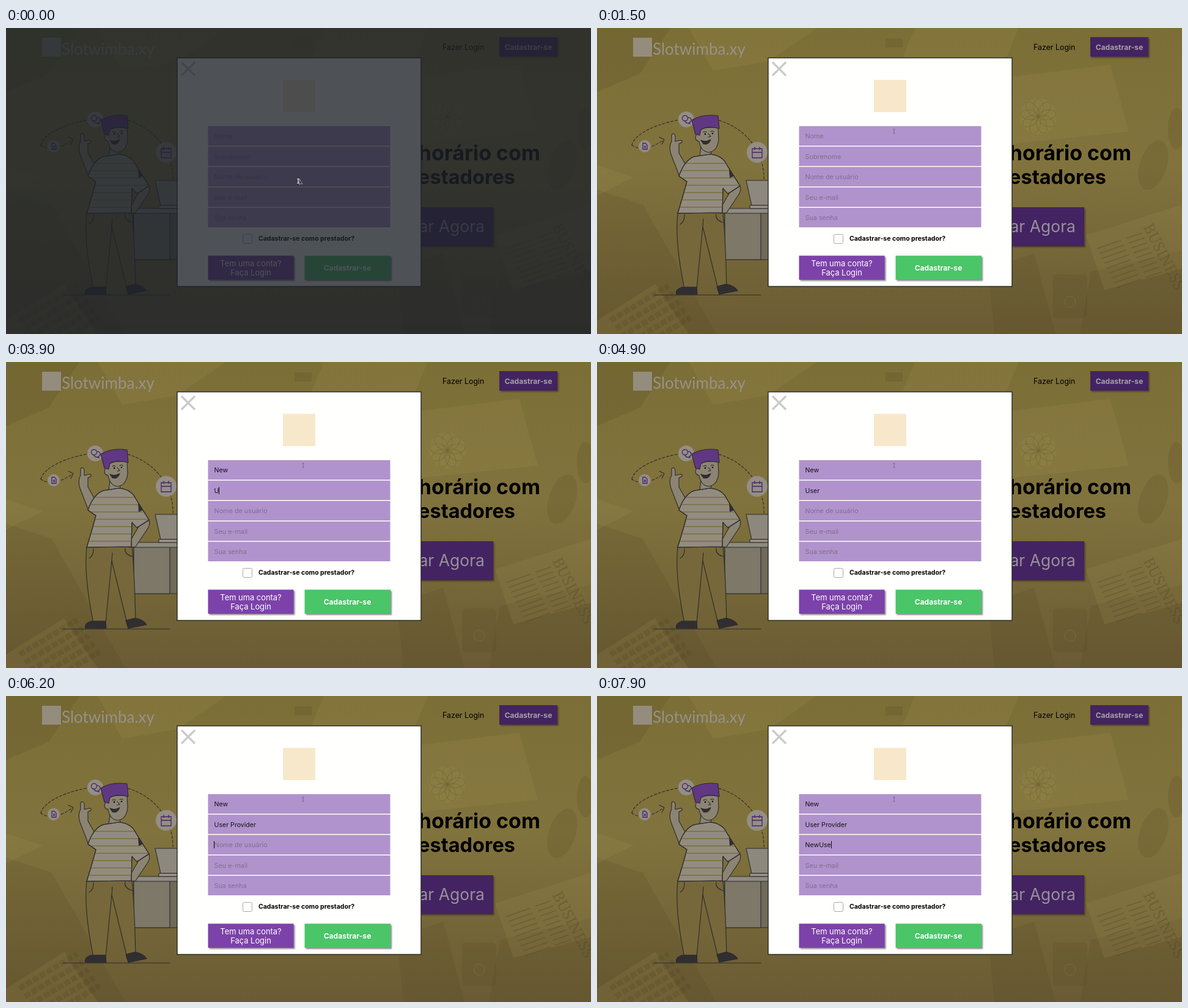
An HTML page that plays this animation: 957x502 px, repeating every 8000 ms.

```html
<!DOCTYPE html>
<html lang="pt">
<head>
<meta charset="utf-8">
<title>Cadastro</title>
<style>
  html, body { margin: 0; width: 100%; height: 100%; overflow: hidden; background: #7a6c38; }
  svg { display: block; width: 957px; height: 502px; font-family: Inter, "Open Sans", sans-serif; }
  .bold { font-weight: 700; }
  .mid { text-anchor: middle; }
  .end { text-anchor: end; }
  .ink { stroke: #2b2a2c; stroke-width: 1.1; stroke-linejoin: round; stroke-linecap: round; }
  .icon { fill: none; stroke: #452663; stroke-width: 1.3; }
  .pale { fill: #948e86; }
  .field { white-space: pre; }
</style>
</head>
<body>
<svg viewBox="0 0 957 502">
  <defs>
    <linearGradient id="desk" x2="0" y2="1">
      <stop offset="0" stop-color="#7b6e36"/>
      <stop offset=".45" stop-color="#81733d"/>
      <stop offset="1" stop-color="#6a5b34"/>
    </linearGradient>
    <filter id="soft" x="-10%" y="-10%" width="120%" height="120%"><feGaussianBlur stdDeviation="1"/></filter>
    <clipPath id="shirtClip"><path id="shirt" d="M159 211L185 207Q205 209 212 224L234 259L214 272L206 263L205 303L132 304Q141 275 147 252L134 243Q143 217 159 211Z"/></clipPath>
  </defs>

  <!-- Blurred desk photo -->
  <rect width="957" height="502" fill="url(#desk)"/>
  <g fill="#4d4222" fill-opacity=".17">
    <path d="M0 0H120L70 75L0 105Z"/>
    <path d="M0 265L75 290L195 502H0Z"/>
    <path d="M640 395L715 370L750 502H650Z"/>
    <rect x="746" y="404" width="56" height="72" rx="6"/>
    <path d="M808 400L957 365V502H790Z"/>
    <rect x="472" y="17" width="28" height="15"/>
    <ellipse cx="910" cy="225" rx="22" ry="42" transform="rotate(18 910 225)"/>
    <ellipse cx="948" cy="165" rx="14" ry="34"/>
  </g>
  <g fill="#a39355" fill-opacity=".18">
    <path d="M150 0H360L280 55L190 70Z"/>
    <path d="M520 0H690L670 48H500Z"/>
    <path d="M680 80L840 60L870 170L680 190Z"/>
    <path d="M800 340L957 290V395L830 430Z"/>
    <path d="M0 225L60 245L0 275Z"/>
    <path d="M0 480L95 420L150 502H0Z"/>
    <circle cx="722" cy="145" r="30"/>
  </g>
  <g id="keyboard" fill="none" stroke="#4a3e22" stroke-opacity=".22" stroke-width="9" stroke-dasharray="10 3"/>
  <g id="news" fill="none" stroke="#4a3e22" stroke-opacity=".25" stroke-width="2"/>
  <g id="flower" fill="none" stroke="#5d512a" stroke-opacity=".3"/>
  <circle cx="774" cy="449" r="9" fill="none" stroke="#8f7f4c" stroke-opacity=".4"/>
  <text transform="translate(893 326) rotate(63)" font-size="25" font-family="Noto Serif, serif" fill="#4a3e22" opacity=".3">BUSINESS</text>

  <!-- Header and headline -->
  <rect x="59" y="16" width="31" height="31" fill="#948c7d"/>
  <text x="91" y="44" font-size="26" fill="#96918b" font-family="Lato, sans-serif">Slotwimba.xy</text>
  <text x="714" y="36" font-size="12.4">Fazer Login</text>
  <rect x="809" y="17" width="95" height="32" fill="#443820" opacity=".7" filter="url(#soft)"/>
  <rect x="807" y="15" width="95" height="32" fill="#432361"/>
  <text class="bold mid" x="854.5" y="36" font-size="12.1" fill="#a5a1a7">Cadastrar-se</text>
  <text class="bold end" x="874" y="217" font-size="34">seu horário com</text>
  <text class="bold end" x="833" y="256" font-size="32.5">prestadores</text>
  <rect x="562" y="296" width="237" height="64" fill="#443820" opacity=".7" filter="url(#soft)"/>
  <rect x="560" y="294" width="237" height="64" fill="#432361"/>
  <text class="end" x="783" y="335" font-size="26.5" fill="#97919b">Agendar Agora</text>

  <!-- Illustration -->
  <g fill="none" class="ink" stroke-dasharray="4 3">
    <path d="M57 192C62 172 100 157 133 151"/>
    <path d="M57 192C70 203 92 196 108 184"/>
    <path d="M158 149C215 140 275 185 273 250"/>
  </g>
  <path class="ink" fill="none" d="M102 179L110 183L106 191M93 438H268"/>
  <g class="pale">
    <circle cx="146" cy="150" r="13"/><circle cx="78" cy="194" r="10"/><circle cx="262" cy="204" r="17"/>
  </g>
  <g class="icon">
    <circle cx="144" cy="148" r="4.5"/><path d="M149 147a4 4 0 0 1 2 8l1 2l-4-1q-3 0-4-3"/>
    <path d="M75 189h4l3 3v7h-7zM77 194h3M77 196h3"/>
    <path d="M254 198h16v15h-16zM254 204h16M258 195v5M266 195v5"/>
  </g>
  <g class="ink">
    <path fill="#6f6a59" d="M209 303H281V380H209Z"/>
    <path fill="#7d7868" d="M209 303H268V380H209Z"/>
    <path fill="#908b80" d="M205 296H281V304H205Z"/>
    <path fill="#8d887d" d="M244 250H281V291H253Z"/>
    <path fill="#9a948a" d="M250 291H281V296H250Z"/>
    <path fill="#76683a" d="M132 303H206Q210 340 212 424H197L173 326L163 428H143Q127 350 132 303Z"/>
    <path fill="none" d="M174 313L173 326M143 306Q144 317 136 322M195 305Q193 315 206 319"/>
    <path fill="#302e31" d="M140 425H163L164 437H130Q127 429 140 425ZM196 424L211 420Q226 423 230 431L200 437Z"/>
    <path fill="#8c8473" d="M134 241L121 207Q117 194 122 186L122 175Q126 171 128 177L128 186L137 184Q143 187 134 190L134 205L147 228L147 250Z"/>
    <path fill="#8c8473" d="M217 270L234 259Q237 267 230 276L212 303L201 304L202 296Z"/>
    <path fill="#8c8473" d="M170 195L168 210Q178 220 187 208L186 198Z"/>
    <use href="#shirt" fill="#928c80"/>
  </g>
  <g id="stripes" clip-path="url(#shirtClip)" stroke="#80754b" stroke-width="2"/>
  <use href="#shirt" class="ink" fill="none"/>
  <path d="M216 230L224 243L217 246Z" fill="#302e31"/>
  <g class="ink">
    <path fill="#8c8473" d="M163 165L198 162L199 183Q197 202 183 204Q170 203 167 186Q158 184 163 174Z"/>
    <path fill="#603783" d="M155 151Q174 140 198 144L200 165Q180 160 170 167L168 176L161 174Z"/>
    <path fill="#302e31" d="M170 184Q177 188 186 183Q182 193 174 190Z"/>
    <path fill="none" d="M174 171q3-2 5 0M186 170q3-2 5 0M182 173l4 5l-4 1"/>
  </g>
  <circle cx="177" cy="174" r="1.3"/><circle cx="189" cy="173" r="1.3"/>

  <!-- Sign-up dialog -->
  <rect x="280" y="49" width="399" height="375" fill="#fffffd" stroke="#26281f" stroke-width="1.4"/>
  <path d="M287 56L309 78M309 56L287 78" stroke="#cacaca" stroke-width="3.2"/>
  <rect x="453" y="85" width="53" height="53" fill="#f8e8cb"/>
  <g id="fields"></g>
  <rect id="caret" width="1" height="12" fill="#111"/>
  <rect x="387.5" y="338.5" width="15" height="15" rx="2" fill="#fff" stroke="#aaa"/>
  <text class="bold" x="413" y="349" font-size="10.5">Cadastrar-se como prestador?</text>
  <g fill="#8d8791" filter="url(#soft)"><rect x="332.5" y="375.5" width="140" height="39.5"/><rect x="490.5" y="375.5" width="140.5" height="39.5"/></g>
  <rect x="330.5" y="373.5" width="140" height="39.5" fill="#7c42a9"/>
  <rect x="488.5" y="373.5" width="140.5" height="39.5" fill="#4ac568"/>
  <g class="mid" fill="#fff" font-size="12.9">
    <text x="400.5" y="391">Tem uma conta?</text>
    <text x="400.5" y="405.5">Faça Login</text>
    <text class="bold" x="558.5" y="398" font-size="12.1">Cadastrar-se</text>
  </g>

  <rect id="shade" width="957" height="502" fill="#1d2229" opacity=".78"/>
  <path id="pointer" d="M480 248V257L482 255L485 256Z" fill="#222" stroke="#ccc" stroke-width=".7"/>
  <path id="beam" d="M-1.5-3.5H1.5M0-3.5V3.5M-1.5 3.5H1.5" fill="none"/>
</svg>
<script>
const $ = id => document.getElementById(id);
const make = (parent, tag, attrs) => {
  const el = document.createElementNS("http://www.w3.org/2000/svg", tag);
  for (const name in attrs) el.setAttribute(name, attrs[name]);
  return parent.appendChild(el);
};
const show = (el, on) => el.setAttribute("visibility", on ? "visible" : "hidden");

// Repeated scenery
for (let i = 0; i < 5; i++) make($("keyboard"), "path", { d: `M${22 + i * 9} ${480 + i * 13}l95 -57` });
for (let i = 0; i < 9; i++) make($("news"), "path", { d: `M${818 + i * 4} ${362 + i * 8}l40 -14m8 -3l26 -9` });
for (let i = 0; i < 9; i++) make($("flower"), "ellipse", { cx: 722, cy: 130, rx: 8, ry: 14, transform: `rotate(${i * 40} 722 145)` });
for (let y = 222; y < 305; y += 12) make($("stripes"), "path", { d: `M130 ${y}H238` });

const fields = [
  { hint: "Nome", value: "New", focus: 900, keys: [1600, 1800, 1900] },
  { hint: "Sobrenome", value: "User Provider", focus: 3400,
    keys: [3900, 4100, 4200, 4300, 4400, 5000, 5200, 5300, 5500, 5600, 5700, 5900, 5900] },
  { hint: "Nome de usuário", value: "NewUse", focus: 6200, keys: [6700, 6900, 7000, 7600, 7800, 7900] },
  { hint: "Seu e-mail", value: "", focus: Infinity, keys: [] },
  { hint: "Sua senha", value: "", focus: Infinity, keys: [] }
];
fields.forEach((field, i) => {
  field.y = 161 + i * 33.5;
  make($("fields"), "rect", { x: 330.5, y: field.y, width: 298, height: 32, fill: "#b093cc" });
  field.text = make($("fields"), "text", { class: "field", x: 340.5, y: field.y + 20 });
});

const caretOff = [[1500, 1600], [2500, 3000], [4900, 5000]];

function draw(t) {
  let focused = null;
  for (const field of fields) {
    const typed = field.value.slice(0, field.keys.filter(k => k <= t).length);
    field.text.textContent = typed || field.hint;
    field.text.setAttribute("fill", typed ? "#15111a" : "#806d91");
    field.text.setAttribute("font-size", typed ? 10.6 : 10.8);
    if (t >= field.focus) focused = { field, typed };
  }
  show($("caret"), focused && !caretOff.some(([from, to]) => t >= from && t < to));
  if (focused) {
    const { field, typed } = focused;
    const width = typed ? field.text.getComputedTextLength() : 0;
    $("caret").setAttribute("x", Math.ceil(340 + width));
    $("caret").setAttribute("y", Math.round(field.y + 10));
  }

  const dark = t < 100;
  show($("shade"), dark);
  show($("pointer"), dark);
  const [x, y] = dark ? [478, 251] : t < 400 ? [481, 250] : t < 500 ? [483, 205] : t < 700 ? [486, 169] : [486, 169.5];
  $("beam").setAttribute("transform", `translate(${x} ${y})`);
  $("beam").setAttribute("stroke", dark ? "#fff" : "#75687f");
}

function tick() {
  draw(performance.now() % 8000);
  requestAnimationFrame(tick);
}
tick();
</script>
</body>
</html>
```
